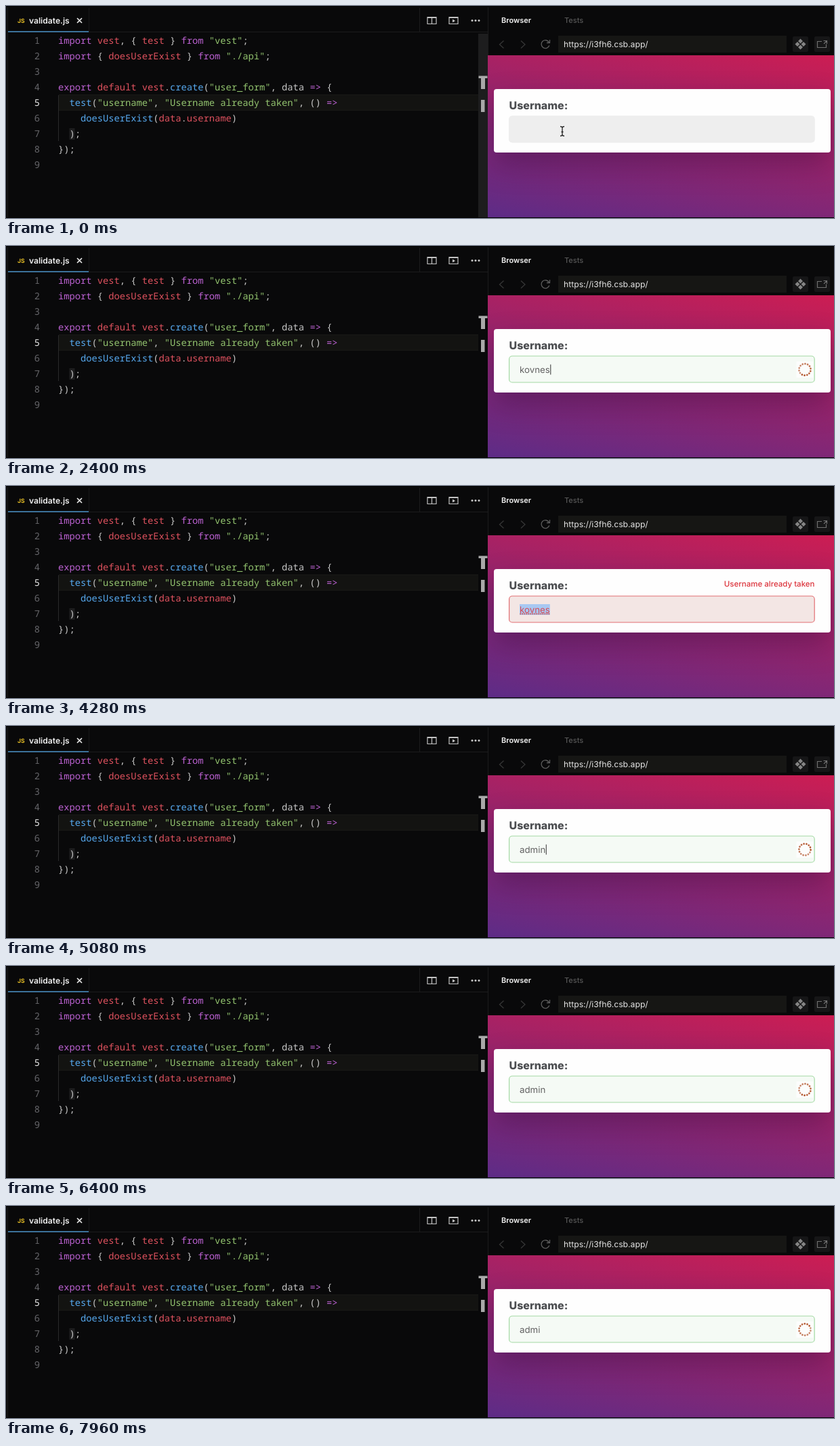
Animation, 1222 px wide and 314 px high, one loop 8 s. Source, as an HTML page:

```html
<!DOCTYPE html>
<html lang="en">
<head>
<meta charset="utf-8">
<title>Async username validation</title>
<style>
  html, body { margin: 0; width: 100%; height: 100%; overflow: hidden; background: #09090a; }
  svg { position: absolute; left: 0; top: 0; display: block; }
  text { font-family: Inter, Roboto, sans-serif; white-space: pre; text-rendering: geometricPrecision; }
  #code text { font: 500 13.75px "Noto Sans Mono", "DejaVu Sans Mono", monospace; fill: #c8c8c8; font-variant-ligatures: none; }
  #code .num { fill: #66666a; text-anchor: end; }
  #code .now { fill: #e8e8e8; }
  #code .k { fill: #bd62d3; } #code .r { fill: #e0525f; } #code .g { fill: #93c46f; } #code .b { fill: #57aaf0; }
  .line { fill: none; stroke: #c4c4c4; stroke-width: 1.2; }
  .dim { stroke: #363636; stroke-width: 1.3; }
  #preview { position: absolute; left: 711px; top: 73px; width: 511px; height: 240px; overflow: hidden;
    background: linear-gradient(192deg, #cc1d53, #5d2c87); }
  #card { position: absolute; left: 8.5px; top: 50px; width: 497px; height: 94px; border-radius: 4px;
    background: #fefefe; box-shadow: 0 18px 40px rgba(40, 10, 60, .36); }
  #field { rx: 4.5px; stroke-width: 1.2; }
</style>
</head>
<body>
<div id="preview"><div id="card"></div></div>
<svg width="1222" height="314" viewBox="0 0 1222 314">
  <!-- editor frame -->
  <path d="M2.5 2V313M711.5 2V73M610.5 3V38" stroke="#1b1b1c" fill="none"/>
  <path d="M3 38.5H711" stroke="#1b1b1c"/>
  <path d="M122.5 3V38" stroke="#171718"/>
  <path d="M3 38H122" stroke="#4a92c9" stroke-width="1.3"/>
  <path d="M0 313.5H1222M0 .5H1222" stroke="#000"/>
  <text x="17" y="25" font-size="8.6" font-weight="700" fill="#e5bd25">JS</text>
  <text x="34" y="25.5" font-size="12.1" font-weight="600" fill="#f2f2f2">validate.js</text>
  <path d="M105 18l7 7m0-7l-7 7" stroke="#eee" stroke-width="1.6"/>
  <g class="line">
    <path d="M622 16.5h13v10h-13zM628.5 16.5v10M622 17.5h13"/>
    <path d="M654 16.5h13v10h-13zM654 17.5h13"/>
    <path d="M659 19.5v5l4-2.5z" fill="#c4c4c4" stroke="none"/>
  </g>
  <g fill="#c8c8c8"><circle cx="688" cy="21.5" r="1.5"/><circle cx="693" cy="21.5" r="1.5"/><circle cx="698" cy="21.5" r="1.5"/></g>

  <!-- code -->
  <rect x="78" y="131.5" width="619" height="23" fill="#131311"/>
  <path d="M78 131.5H697M78 154.5H697" stroke="#191917"/>
  <path d="M77.5 132V200" stroke="#2a2a2b"/>
  <rect x="93.5" y="181" width="8" height="17" fill="#1d1d1e"/>
  <g id="code"></g>

  <!-- overview ruler -->
  <rect id="ruler" x="697" y="41" width="14" height="272" fill="#1d1d1e"/>
  <path d="M697.5 103.5h13v3.5h-3.5v16h-6v-16h-3.5zM701 139h5.5v18h-5.5z" fill="#a9a9a9"/>

  <!-- browser chrome -->
  <text x="731" y="25.3" font-size="11" font-weight="600" fill="#f4f4f4">Browser</text>
  <text x="824" y="25.3" font-size="11" font-weight="500" fill="#575757">Tests</text>
  <path class="line dim" d="M734.5 51.5l-6 5.5 6 5.5M760 51.5l6 5.5-6 5.5"/>
  <path class="line dim" style="stroke:#5c5c5c" d="M801.5 54a6 6 0 1 0 .3 4.5M802.5 50v4.5h-4.5"/>
  <rect x="815" y="44" width="337" height="25" fill="#161614"/>
  <text x="823" y="60.5" font-size="12.2" fill="#e4e4e4">https://i3fh6.csb.app/</text>
  <g fill="#161617"><rect x="1161" y="45" width="23" height="23" rx="2"/><rect x="1193" y="45" width="23" height="23" rx="2"/></g>
  <path d="M1172.5 48.5l3.5 3.5-3.5 3.5-3.5-3.5zM1172.5 57.5l3.5 3.5-3.5 3.5-3.5-3.5zM1168 53l3.5 3.5-3.5 3.5-3.5-3.5zM1177 53l3.5 3.5-3.5 3.5-3.5-3.5z" fill="#858585"/>
  <path class="line" style="stroke:#707070" d="M1204 52.5h-6.5v9h13v-5M1206.5 51.5h5v4.5M1211 52l-4 4"/>

  <!-- form -->
  <text x="742.5" y="153" font-size="16" font-weight="800" fill="#4b4d50">Username:</text>
  <text id="message" x="1193.5" y="149.2" font-size="11.5" font-weight="500" text-anchor="end" fill="#dc343c">Username already taken</text>
  <rect id="field" x="742.6" y="163" width="450.6" height="39"/>
  <rect id="selection" x="758" y="175" height="16" fill="#a9c8f2"/>
  <text id="value" x="758" y="187.5" font-size="13.3"></text>
  <path id="squiggle" stroke="#e0473d" stroke-width="1.7" stroke-dasharray="1.7 1.3"/>
  <rect id="caret" y="175.5" width="1.1" height="15" fill="#444"/>
  <g id="spinner"><rect x="1166.5" y="171" width="25" height="24" fill="#fcfdfc"/><g id="dots"></g></g>
  <path id="pointer" d="M818 178.5q3 0 3 2v10q0 2-3 2M824 178.5q-3 0-3 2v10q0 2 3 2M819.5 186.5h3" fill="none" stroke="#222" stroke-width="1.3"/>
</svg>
<script>
const $ = id => document.getElementById(id);
const NS = 'http://www.w3.org/2000/svg';
const LOOP = 8000, USER = 'kovnes';

function add(parent, tag, attrs, text = '') {
  const el = document.createElementNS(NS, tag);
  for (const name in attrs) el.setAttribute(name, attrs[name]);
  el.textContent = text;
  return parent.appendChild(el);
}

// Each token is "class|text"; an empty class keeps the default colour.
const code = [
  ['k|import ', 'r|vest', '|, { ', 'r|test', '| } ', 'k|from ', 'g|"vest"', '|;'],
  ['k|import ', '|{ ', 'r|doesUserExist', '| } ', 'k|from ', 'g|"./api"', '|;'],
  [],
  ['k|export ', 'r|default ', 'r|vest', '|.', 'b|create', '|(', 'g|"user_form"', '|, data ', 'k|=>', '| {'],
  ['|  ', 'b|test', '|(', 'g|"username"', '|, ', 'g|"Username already taken"', '|, () ', 'k|=>'],
  ['|    ', 'b|doesUserExist', '|(', 'r|data', '|.', 'r|username', '|)'],
  ['|  );'],
  ['|});'],
  []
];
code.forEach((tokens, i) => {
  const y = 55.5 + i * 23;
  add($('code'), 'text', { x: 50, y, class: i === 4 ? 'num now' : 'num' }, i + 1);
  const row = add($('code'), 'text', { x: 77, y });
  for (const token of tokens) {
    const [cls, text] = token.split('|');
    add(row, 'tspan', { class: cls }, text);
  }
});

const DOTS = 14;
for (let i = 0; i < DOTS; i++) {
  const a = i / DOTS * 2 * Math.PI;
  add($('dots'), 'circle', {
    cx: 8.6 * Math.cos(a), cy: 8.6 * Math.sin(a), r: 1.4,
    fill: '#b04f24', opacity: 0.6 + 0.4 * i / DOTS
  });
}

const last = (list, t) => list.filter(entry => entry[0] <= t).pop();
const mix = (a, b, p) => a.map((v, i) => v + (b[i] - v) * p);
const rgb = c => `rgb(${c.map(Math.round)})`;

function typed(word, start, step) {
  return [...word].map((_, i) => [start + i * step, word.slice(0, i + 1)]);
}
const values = [[0, ''], [1480, USER[0]], ...typed(USER, 1520, 120).slice(1),
  ...typed('admin', 4480, 60), [7360, 'admi']];

const looks = {
  idle: { fill: [238, 238, 238], edge: [238, 238, 238], ink: [85, 85, 85] },
  focus: { fill: [242, 242, 242], edge: [224, 224, 224], ink: [85, 85, 85] },
  valid: { fill: [245, 250, 245], edge: [164, 218, 164], ink: [98, 98, 98] },
  error: { fill: [243, 230, 228], edge: [226, 112, 116], ink: [216, 76, 86] }
};
const states = [[-200, 'idle'], [40, 'focus'], [1480, 'valid'], [3660, 'error'],
  [4480, 'valid'], [6660, 'error'], [7360, 'valid']];

const caretFlips = [80, 400, 840, 1280, 1480, 2600, 3080, 3560, 4040, 4280,
  4480, 5120, 5600, 6080, 6560, 7040, 7360, 7800];

const show = (id, on) => { $(id).style.visibility = on ? 'visible' : 'hidden'; };

function draw(t) {
  const text = last(values, t)[1];
  if ($('value').textContent !== text) $('value').textContent = text;
  const width = text ? $('value').getComputedTextLength() : 0;

  const [since, name] = last(states, t);
  const previous = states[Math.max(0, states.findIndex(s => s[0] === since) - 1)][1];
  const p = Math.min(1, (t - since + 40) / 140);
  const tint = key => rgb(mix(looks[previous][key], looks[name][key], p));
  $('field').style.fill = tint('fill');
  $('field').style.stroke = tint('edge');
  $('value').style.fill = tint('ink');

  show('message', name === 'error');
  show('spinner', name === 'valid');
  $('dots').setAttribute('transform', `translate(1179 183) rotate(${t * 0.36})`);

  show('selection', t >= 4280 && t < 4480);
  $('selection').setAttribute('width', width);
  show('squiggle', t >= 2600 && t < 4480);
  $('squiggle').setAttribute('d', `M758.5 189.3h${width}`);

  show('caret', caretFlips.filter(f => f <= t).length % 2);
  $('caret').setAttribute('x', 758.4 + width);
  show('pointer', t < 80);
  $('ruler').style.opacity = Math.min(1, Math.max(0, (520 - t) / 160));
}

const begin = performance.now();
function tick(now) {
  draw(Math.max(0, now - begin) % LOOP);
  requestAnimationFrame(tick);
}
draw(0);
requestAnimationFrame(tick);
</script>
</body>
</html>
```
